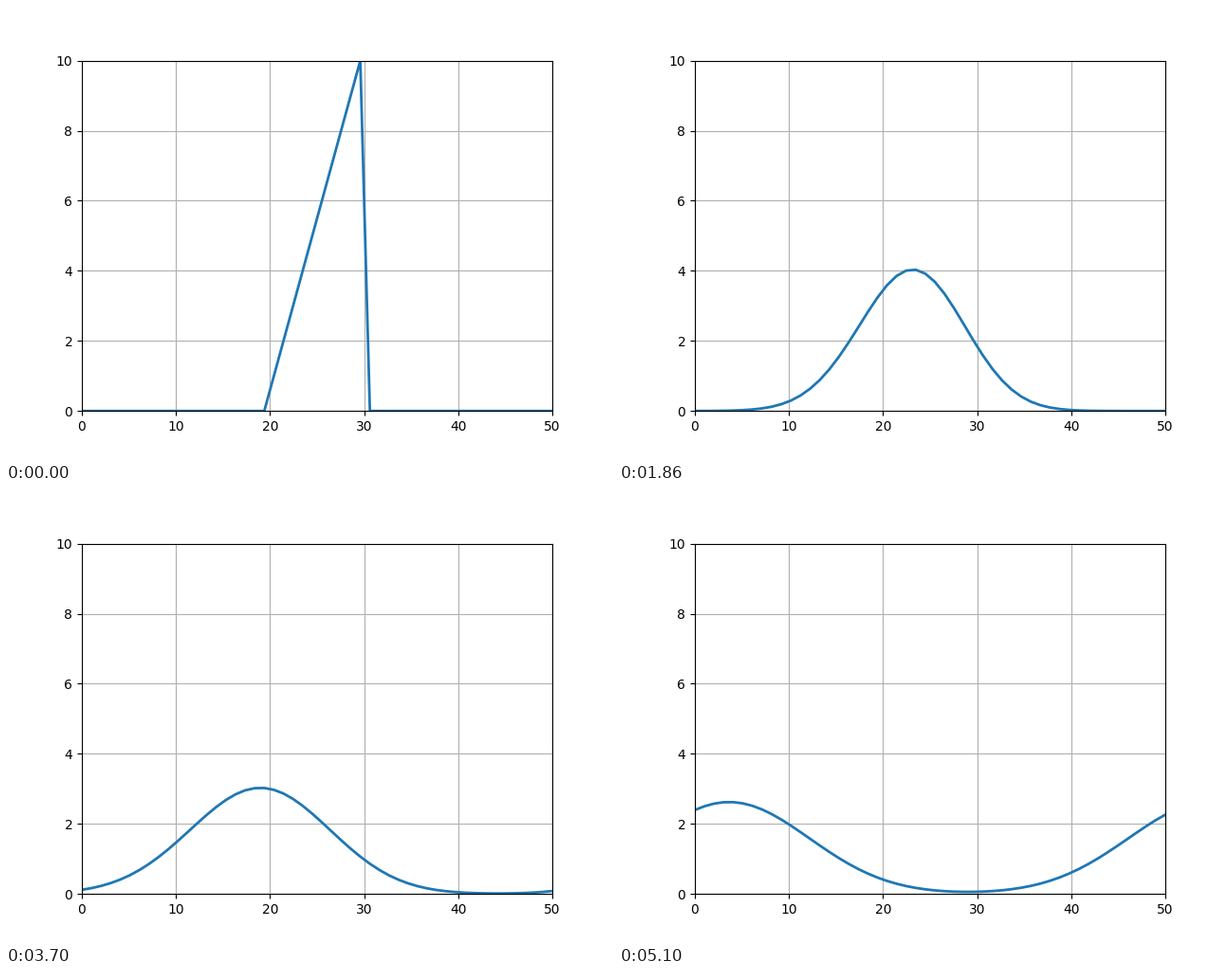
A matplotlib script that plays this animation: 640 px wide and 480 px high, repeating every 5120 ms.

```python
import numpy as np
import matplotlib.pyplot as plt
from matplotlib.animation import FuncAnimation

N = 50          # grid points, periodic
FRAMES = 256
COURANT = 0.5   # v * dt / dx

x = np.linspace(0, 50, N)


def solve():
    """Advect a sawtooth with the first-order upwind scheme."""
    u = np.zeros(N)
    u[19:30] = np.arange(11)
    states = [u]
    for _ in range(FRAMES - 1):
        u = u - COURANT * (u - np.roll(u, 1))
        states.append(u)
    return states


states = solve()

fig, ax = plt.subplots(figsize=(6.4, 4.8), dpi=100)
ax.set_xlim(0, 50)
ax.set_ylim(0, 10)
ax.grid()
line, = ax.plot(x, states[0], lw=2)


def update(i):
    line.set_ydata(states[i])
    return line,


anim = FuncAnimation(fig, update, frames=FRAMES, init_func=lambda: update(0),
                     interval=20, repeat=True, repeat_delay=0)

plt.show()
```
